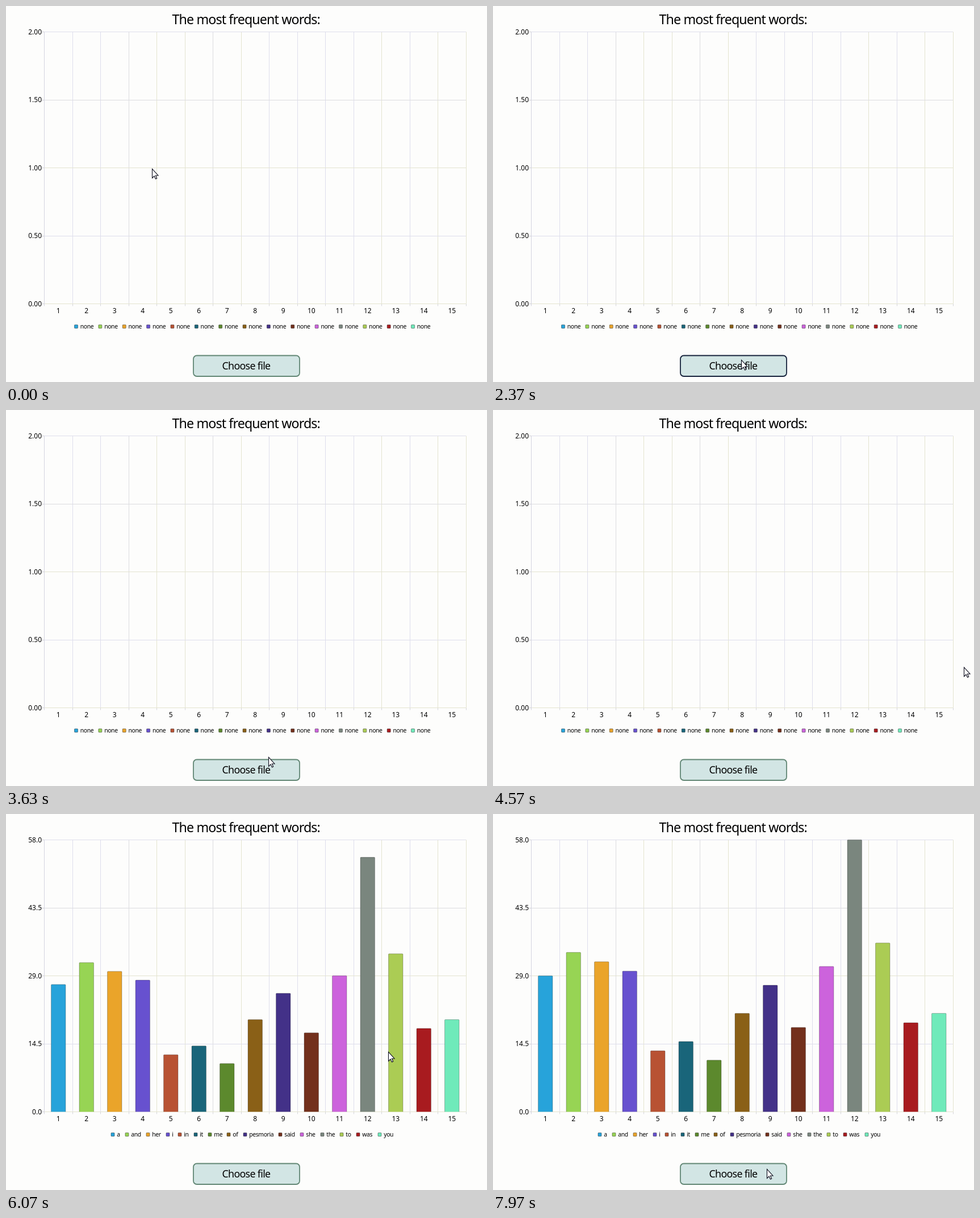
Write an HTML page that moves like this. It is 847 px wide and 661 px high and loops after 8000 ms.

```html
<!DOCTYPE html>
<html lang="en">
<head>
<meta charset="utf-8">
<title>Word frequency chart</title>
<style>
  html, body { margin: 0; width: 100%; height: 100%; overflow: hidden; background: #fdfdfc; }
  svg { display: block; width: 100%; height: 100%; }
  text { font-family: "Noto Sans", "Open Sans", sans-serif; fill: #000; }
  .axis { font-size: 12px; }
  .legend, .big, .button { letter-spacing: -.037em; }
  .legend { font-size: 10.4px; }
  .big { font-size: 23.2px; }
  .button { font-size: 17.8px; }
</style>
</head>
<body>
<svg id="stage" viewBox="0 0 847 661">
  <rect width="847" height="661" fill="#fdfdfc"/>
  <text class="big" x="292.5" y="32">The most frequent words:</text>
  <g id="grid"></g>
  <g id="bars"></g>
  <g id="labels"></g>
  <g id="emptyLegend"></g>
  <g id="wordLegend"></g>
  <rect id="button" x="330" y="614.5" width="187" height="36.5" rx="6" stroke-width="1.8"/>
  <g id="spinner" fill="none" stroke-width="4">
    <circle cx="353" cy="633" r="9.8" stroke="#adc6d9"/>
    <circle id="arc" cx="353" cy="633" r="9.8" stroke="#2bb457" pathLength="100" transform="rotate(-90 353 633)"/>
  </g>
  <text class="button" x="380.5" y="639">Choose file</text>
  <path id="cursor" d="M.5 .5V16.5L4 13 6.5 18 8.7 17 6.4 12H11Z" fill="#fff" stroke="#0c0c1c" stroke-width="1.1"/>
</svg>
<script>
const LOOP = 8000, LEFT = 67.5, RIGHT = 810, TOP = 45.5, BOTTOM = 523.5;
const COUNT = 15, STEP = (RIGHT - LEFT) / COUNT, UNIT = (BOTTOM - TOP) / 58;
const BUSY = 5670, LOADED = 5870, GROW = 335;

const words = "a and her i in it me of pesmoria said she the to was you".split(" ");
const counts = [29, 34, 32, 30, 13, 15, 11, 21, 27, 18, 31, 58, 36, 19, 21];
const legendX = [188, 213, 250, 285, 306, 334, 359, 392, 421, 483, 521, 557, 591, 620, 658];
const colors = ["#27a3da", "#97d454", "#eaa42a", "#6751cf", "#b85233", "#19657a", "#5c892d", "#8a6017",
  "#433188", "#73301c", "#cc63dc", "#7a867e", "#abcc54", "#a81b1f", "#6feaba"];

// Cursor stops: time, x, y
const path = [
  [0, 257, 286], [350, 257, 286], [1230, 472, 368], [2050, 437, 622], [2900, 437, 622],
  [3450, 462, 610], [3900, 462, 610], [4700, 856, 440], [5860, 856, 378],
  [5880, 820, 386], [6070, 673, 418], [6700, 673, 418], [7970, 482, 624]
];

const $ = id => document.getElementById(id);

function add(parent, name, attrs, text) {
  const el = document.createElementNS("http://www.w3.org/2000/svg", name);
  for (const key in attrs) el.setAttribute(key, attrs[key]);
  if (text !== undefined) el.textContent = text;
  return $(parent).appendChild(el);
}

function line(x1, y1, x2, y2, stroke) {
  add("grid", "line", { x1, y1, x2, y2, stroke });
}

function legend(parent, x, i, label) {
  add(parent, "rect", { x: x - 3, y: 560.5, width: 6, height: 6, rx: .8, fill: colors[i],
    stroke: "#000", "stroke-opacity": .4 });
  add(parent, "text", { class: "legend", x: x + 7.3, y: 567.3 }, label);
}

const snap = v => Math.floor(v) + .5;
const lilac = "#dedeec", yellow = "#e4e4d0", gray = "#dcdce0";
const columnTints = [lilac, lilac, gray, yellow, yellow, gray, yellow, lilac, lilac, lilac, lilac, yellow, lilac, yellow, yellow];

columnTints.forEach((tint, i) => {
  const x = snap(LEFT + STEP * (i + 1));
  line(x, TOP, x, BOTTOM, tint);
  line(x, BOTTOM, x, BOTTOM + 4, "#d4d4da");
});
[lilac, gray, yellow, lilac, yellow].forEach((tint, i) => {
  const y = snap(TOP + i * (BOTTOM - TOP) / 4);
  line(LEFT, y, RIGHT, y, tint);
  line(LEFT - 4, y, LEFT, y, "#d4d4da");
});
line(LEFT, TOP, LEFT, BOTTOM + 4, "#d4d4e0");

const ticks = [0, 1, 2, 3, 4].map(i => add("labels", "text", {
  class: "axis", x: 63, y: TOP + 4.3 + i * (BOTTOM - TOP) / 4, "text-anchor": "end"
}));

const bars = counts.map((count, i) => {
  const center = LEFT + STEP * (i + .5);
  add("labels", "text", { class: "axis", x: center, y: 540.3, "text-anchor": "middle" }, i + 1);
  legend("emptyLegend", 123.5 + i * 42.36, i, "none");
  legend("wordLegend", legendX[i], i, words[i]);
  return add("bars", "path", { fill: colors[i], stroke: "#000", "stroke-opacity": .27 });
});

const show = (id, on) => $(id).setAttribute("display", on ? "inline" : "none");

function cursorAt(t) {
  let i = 0;
  while (i < path.length - 2 && t >= path[i + 1][0]) i++;
  const [t0, x0, y0] = path[i], [t1, x1, y1] = path[i + 1];
  const p = Math.min(1, (t - t0) / (t1 - t0)), e = p * p * (3 - 2 * p);
  return [Math.round(x0 + (x1 - x0) * e), Math.round(y0 + (y1 - y0) * e)];
}

function draw(t) {
  const loaded = t >= LOADED, busy = t >= BUSY && !loaded;
  const [x, y] = cursorAt(t);
  const hover = t < BUSY && x > 330 && x < 517 && y > 614 && y < 651;

  $("cursor").setAttribute("transform", `translate(${x} ${y})`);
  $("button").setAttribute("fill", busy ? "#a3a4a6" : "#d2e5e4");
  $("button").setAttribute("stroke", hover ? "#17233c" : "#628775");

  show("spinner", busy);
  $("arc").setAttribute("stroke-dasharray", `${Math.max(0, (t - BUSY) / 170 * 33)} 100`);

  show("emptyLegend", !loaded);
  show("wordLegend", loaded);
  show("bars", loaded);
  ticks.forEach((el, i) => {
    el.textContent = loaded ? (58 - i * 14.5).toFixed(1) : (2 - i / 2).toFixed(2);
  });

  const grow = 1 - Math.pow(1 - Math.min(1, Math.max(0, t - LOADED) / GROW), 3);
  bars.forEach((bar, i) => {
    const left = LEFT + STEP * (i + .5) - 12.7;
    const height = Math.max(1, counts[i] * UNIT * grow);
    bar.setAttribute("d", `M${left} ${BOTTOM}v${1 - height}q0-1 1-1h23.4q1 0 1 1V${BOTTOM}`);
  });
}

const start = performance.now();
function tick(now) {
  draw(Math.max(0, now - start) % LOOP);
  requestAnimationFrame(tick);
}
draw(0);
requestAnimationFrame(tick);
</script>
</body>
</html>
```
